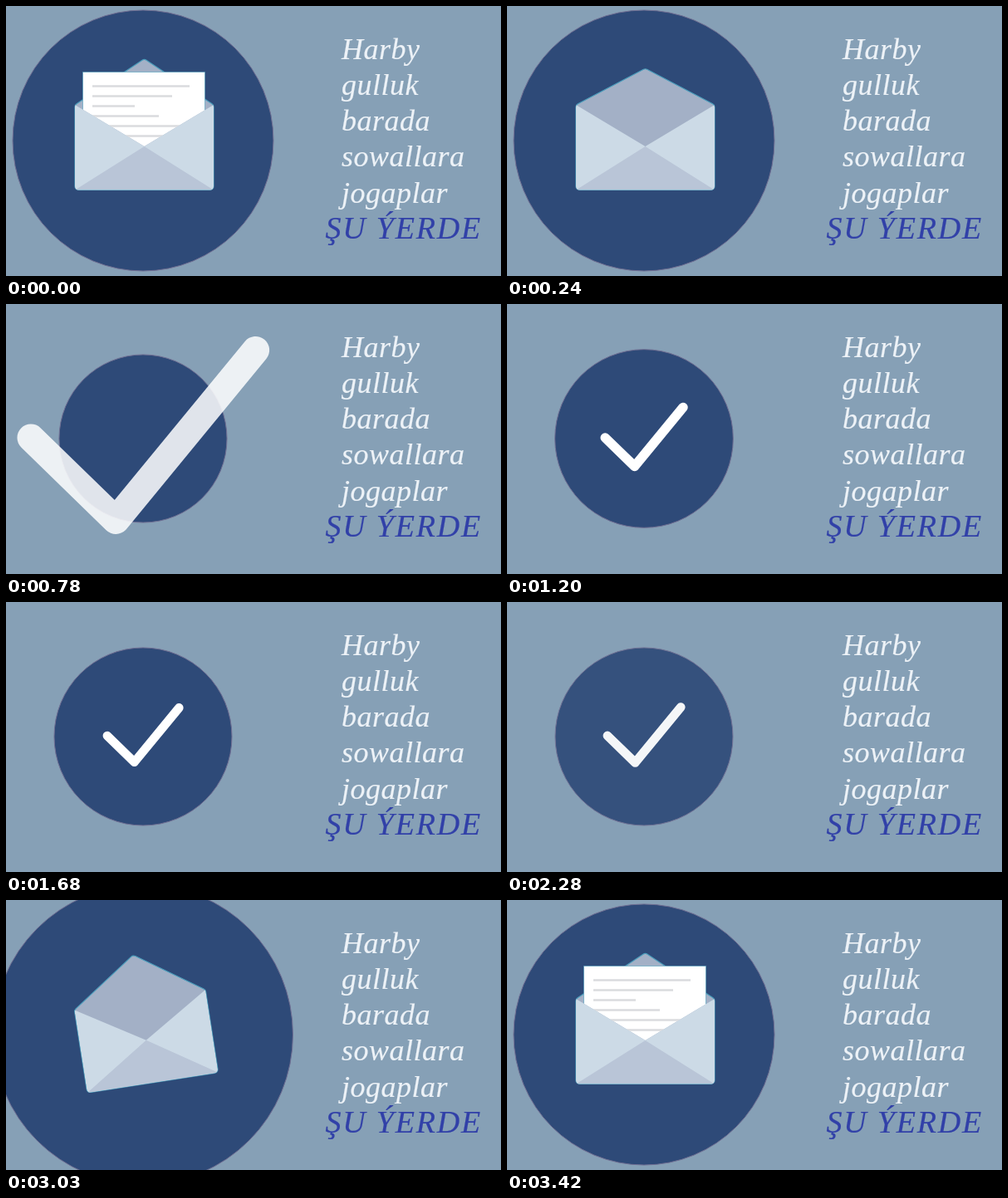
Recreate the animation shown at these times as an HTML page with a canvas. Size 596 by 325 pixels, loop 3.45 s.

```html
<!DOCTYPE html>
<html lang="tk">
<head>
<meta charset="utf-8">
<style>
html, body { margin: 0; width: 100%; height: 100%; overflow: hidden; background: #86a0b6; }
canvas, svg { position: absolute; left: 0; top: 0; }
text { font: italic 36px "Liberation Serif", "Times New Roman", serif; letter-spacing: .5px; fill: #edf2f7; stroke: #edf2f7; stroke-width: .2px; }
.link { font-size: 38px; letter-spacing: 1.8px; fill: #3140a8; stroke: #3140a8; }
</style>
</head>
<body>
<canvas width="596" height="325"></canvas>
<svg width="596" height="325">
  <text x="404" y="64">Harby</text>
  <text x="404" y="107">gulluk</text>
  <text x="404" y="150">barada</text>
  <text x="404" y="193">sowallara</text>
  <text x="404" y="236.5">jogaplar</text>
  <text class="link" x="384.5" y="280">ŞU ÝERDE</text>
</svg>
<script>
const LOOP = 3450, STEP = 30;
const LEFT = 83, RIGHT = 250, MID = 166.5, TOP = 119, BOTTOM = 221.5, FOLD = 169, TIP = 63.5;
const CENTER = 171, PIVOT = 154;
const canvas = document.querySelector('canvas');
const ctx = canvas.getContext('2d');

const progress = (t, from, to) => Math.min(1, Math.max(0, (t - from) / (to - from)));
const smooth = p => p * p * (3 - 2 * p);
const mix = (a, b, p) => a + (b - a) * p;

// Remaining distance (1 to 0) of a damped spring released at `start`.
function spring(t, start, damping, freq) {
  const s = Math.max(0, t - start) / 1000;
  return Math.exp(-damping * s) * (Math.cos(freq * s) + damping / freq * Math.sin(freq * s));
}

function circle(r) {
  ctx.beginPath();
  ctx.arc(165, 162, Math.max(0, r), 0, 7);
  ctx.fillStyle = '#2e4a78';
  ctx.fill();
  ctx.strokeStyle = '#706f93';
  ctx.lineWidth = 1;
  ctx.stroke();
}

// Traces a closed polygon, with rounded corners if r is given.
function trace(points, r = 0) {
  const n = points.length, [a] = points, z = points[n - 1];
  ctx.beginPath();
  ctx.moveTo((z[0] + a[0]) / 2, (z[1] + a[1]) / 2);
  points.forEach((p, i) => {
    const q = points[(i + 1) % n];
    ctx.arcTo(p[0], p[1], q[0], q[1], r);
  });
  ctx.closePath();
}

function envelope({ tip, drop, flip = 0, sx = 1, sy = 1, turn = 0 }) {
  const angle = flip * Math.PI / 2, size = 1 - .4 * flip;
  const cos = Math.cos(turn), sin = Math.sin(turn);
  const map = ([px, py]) => {
    const y0 = (py - CENTER) * size * sy;
    const k = 700 / (700 - y0 * Math.sin(angle));
    const x = (px - MID) * size * sx * k;
    const y = y0 * Math.cos(angle) * k + CENTER - PIVOT;
    return [MID + x * cos - y * sin, PIVOT - 36 * flip + x * sin + y * cos];
  };
  const shape = (points, color, r) => {
    trace(points.map(map), r);
    ctx.fillStyle = color;
    ctx.fill();
  };
  const corner = 4.5 * size * Math.max(.3, Math.cos(angle));
  const apex = [MID, FOLD];
  const back = [[LEFT, TOP], [MID, Math.min(tip, TOP)], [RIGHT, TOP], [RIGHT, BOTTOM], [LEFT, BOTTOM]];

  shape(back, '#a3b0c6', corner);
  ctx.strokeStyle = '#4a9dbb';
  ctx.lineWidth = 1.2;
  ctx.stroke();

  if (drop < 95) {
    ctx.save();
    trace([[LEFT, -40], [RIGHT, -40], [RIGHT, TOP], apex, [LEFT, TOP]].map(map));
    ctx.clip();
    const y = 79.5 + drop;
    shape([[92.5, y], [239.5, y], [239.5, y + 120], [92.5, y + 120]], '#fff');
    ctx.lineWidth = .6;
    ctx.stroke();
    [221, 200, 155, 184, 221, 221].forEach((end, i) => {
      const top = y + 15.8 + i * 12;
      shape([[104, top], [end, top], [end, top + 2.4], [104, top + 2.4]], '#dadbde');
    });
    ctx.restore();
  }

  ctx.save();
  trace(back.map(map), corner);
  ctx.clip();
  shape([[LEFT, TOP], apex, [RIGHT, TOP], [RIGHT, BOTTOM], [LEFT, BOTTOM]], '#ccdae6');
  shape([[LEFT, BOTTOM], apex, [RIGHT, BOTTOM]], '#b9c5d7');
  if (tip > TOP) shape([[LEFT, TOP], [RIGHT, TOP], [MID, tip]], '#dfe8f0');
  ctx.restore();
}

function check(scale, alpha) {
  ctx.save();
  ctx.globalAlpha = alpha;
  ctx.translate(165, 161);
  ctx.scale(scale, scale);
  ctx.beginPath();
  ctx.moveTo(-44, 0);
  ctx.lineTo(-10.7, 32.4);
  ctx.lineTo(44.2, -34.4);
  ctx.strokeStyle = '#fff';
  ctx.lineWidth = 10.8;
  ctx.lineCap = ctx.lineJoin = 'round';
  ctx.stroke();
  ctx.restore();
}

function draw(t) {
  ctx.clearRect(0, 0, 596, 325);
  canvas.style.opacity = t < 2600 ? 1 - progress(t, 2250, 2580) : 1;

  if (t < 2600) {
    circle(107 + 50 * spring(t, 487, 7.1, 10.5));
    if (t < 540) {
      envelope({
        drop: 95 * smooth(progress(t, 0, 240)),
        tip: mix(TIP, 176, smooth(progress(t, 210, 360))),
        flip: progress(t, 330, 540)
      });
    } else {
      check(1 + 3.2 * spring(t, 600, 5.2, 3.75), progress(t, 570, 817));
    }
  } else if (t > 2880) {
    circle(157 * (1 - spring(t, 2880, 12.7, 21)));
    const left = 1 - progress(t, 2880, 3180);
    envelope({
      drop: 95 * (1 - smooth(progress(t, 3090, 3420))),
      tip: TIP,
      sx: 1 - left ** 4.5,
      sy: 1 - left ** 6,
      turn: -1.23 * left ** 3
    });
  }
}

const begin = performance.now();
function tick() {
  const t = (performance.now() - begin) % LOOP;
  draw(Math.floor(t / STEP) * STEP);
  requestAnimationFrame(tick);
}
tick();
</script>
</body>
</html>
```
